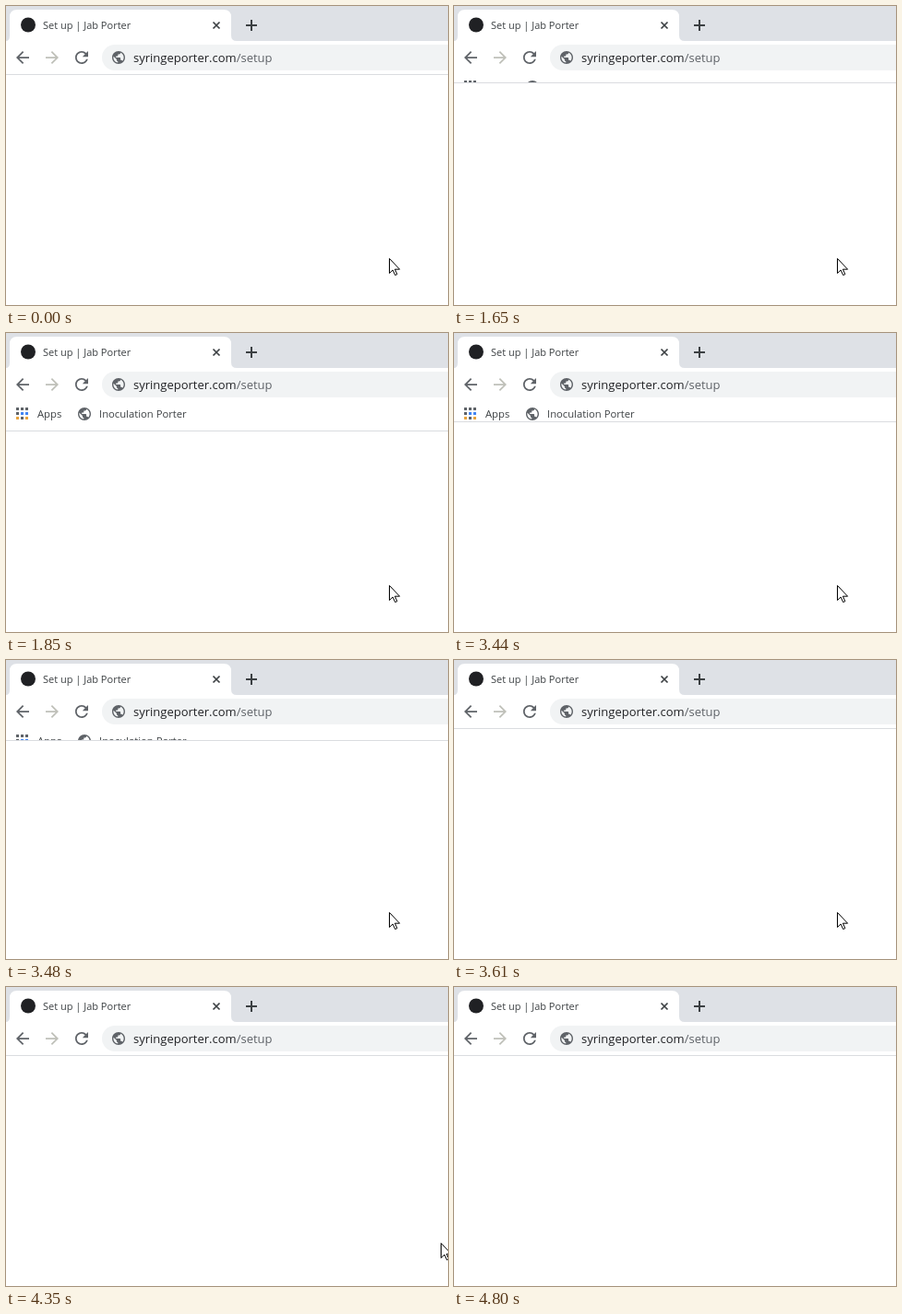
An HTML page for the animation above (4.87 s loop, 479 px wide and 325 px high).

```html
<!DOCTYPE html>
<html lang="en">
<head>
<meta charset="utf-8">
<title>Bookmarks bar</title>
<style>
  html, body { margin: 0; width: 100%; height: 100%; overflow: hidden; background: #fff; }
  svg { display: block; width: 100vw; height: 100vh; }
  text { font-family: "Open Sans", "Noto Sans", sans-serif; fill: #3c4043; }
  .tab { font-size: 11px; }
  .address { font-size: 13px; fill: #202124; }
  .address tspan { fill: #5f6368; }
  .bookmark { font-size: 11.25px; }
</style>
</head>
<body>
<svg viewBox="0 0 479 325">
  <defs>
    <path id="arrow" transform="scale(.875) translate(-12 -12)" d="M20 11H7.83l5.59-5.59L12 4l-8 8 8 8 1.41-1.41L7.83 13H20z"/>
    <path id="globe" transform="scale(.7) translate(-12 -12)" d="M12 2C6.48 2 2 6.48 2 12s4.48 10 10 10 10-4.48 10-10S17.52 2 12 2zm-1 17.93c-3.95-.49-7-3.85-7-7.93 0-.62.08-1.21.21-1.79L9 15v1c0 1.1.9 2 2 2zm6.9-2.54c-.26-.81-1-1.39-1.9-1.39h-1v-3c0-.55-.45-1-1-1H8v-2h2c.55 0 1-.45 1-1V7h2c1.1 0 2-.9 2-2v-.41c2.93 1.19 5 4.06 5 7.41 0 2.08-.8 3.97-2.1 5.39z"/>
  </defs>

  <!-- Tab strip -->
  <rect width="479" height="38" fill="#dee1e6"/>
  <path d="M0 38q4 0 4-6V12q0-8 8-8h224q8 0 8 8v20q0 6 6 6z" fill="#fff"/>
  <circle cx="24" cy="20.5" r="8" fill="#202124"/>
  <text class="tab" x="40" y="25">Set up | Jab Porter</text>
  <path d="M224.5 17.5l7 7m0-7l-7 7" stroke="#3c4043" stroke-width="1.7"/>
  <path d="M260 21h12m-6-6v12" stroke="#3c4043" stroke-width="2"/>

  <!-- Toolbar -->
  <g fill="#5f6368">
    <use href="#arrow" x="18" y="56"/>
    <use href="#arrow" transform="translate(50 56) scale(-1 1)" fill="#bfc0b9"/>
    <path transform="translate(82 56) scale(.875) translate(-12 -12)" d="M17.65 6.35C16.2 4.9 14.21 4 12 4c-4.42 0-7.99 3.58-7.99 8s3.57 8 7.99 8c3.73 0 6.84-2.55 7.73-6h-2.08c-.82 2.33-3.04 4-5.65 4-3.31 0-6-2.69-6-6s2.69-6 6-6c1.66 0 3.14.69 4.22 1.78L13 11h7V4z"/>
    <rect x="104" y="42" width="400" height="28" rx="14" fill="#f1f3f4"/>
    <use href="#globe" x="122" y="56"/>
  </g>
  <text class="address" x="138" y="61">syringeporter.com<tspan>/setup</tspan></text>

  <!-- Bookmarks, uncovered as the page slides down -->
  <g id="apps"></g>
  <text class="bookmark" x="34" y="92">Apps</text>
  <use href="#globe" x="85" y="88" fill="#5f6368"/>
  <text class="bookmark" x="101" y="92">Inoculation Porter</text>

  <g id="page">
    <rect y="74" width="479" height="260" fill="#fff"/>
    <rect y="74" width="479" height="1" fill="#dadce0"/>
  </g>
  <path id="cursor" d="M.5.5v16l3.7-3.5 2.5 5.6 2.2-1-2.5-5.4h5.2z" fill="#fff" stroke="#000"/>
</svg>
<script>
  const LOOP = 4870, BAR = 32;
  const OPEN_TIMES = [1650, 1690, 1740, 1790, 1850];
  const CLOSE_TIMES = [3440, 3480, 3540, 3610];

  // [time, x, y] of the pointer tip
  const EXIT = [[4130, 415, 274], [4260, 443, 274], [4350, 471, 278],
                [4430, 473, 292], [4520, 462, 312], [4600, 450, 326]];
  const PEEK = [[4700, 432, 320], [4800, 434, 322]];

  const page = document.getElementById('page');
  const cursor = document.getElementById('cursor');

  const DOT_COLORS = ['#5f6368', '#5f6368', '#5f6368',
                      '#5f6368', '#4285f4', '#4285f4',
                      '#e8a33d', '#5f6368', '#e8a33d'];
  document.getElementById('apps').innerHTML = DOT_COLORS.map((color, i) =>
    `<rect x="${11 + i % 3 * 5}" y="${81 + Math.floor(i / 3) * 5}" width="3" height="3" fill="${color}"/>`
  ).join('');

  // Ease-out progress, sampled at the latest step time
  function steppedProgress(t, start, times) {
    const now = times.filter(time => time <= t).pop();
    if (now === undefined) return 0;
    const left = 1 - (now - start) / (times[times.length - 1] - start);
    return 1 - left * left;
  }

  function along(path, t) {
    const i = path.findIndex(key => key[0] > t);
    const [t0, x0, y0] = path[i - 1], [t1, x1, y1] = path[i];
    const k = (t - t0) / (t1 - t0);
    return [x0 + (x1 - x0) * k, y0 + (y1 - y0) * k].map(Math.round);
  }

  function pointerAt(t) {
    if (t < 4170) return [415, 274];
    if (t < 4600) return along(EXIT, t);
    if (t >= 4700 && t < 4800) return along(PEEK, t);
    return [0, 400];
  }

  function draw() {
    const t = performance.now() % LOOP;
    const shown = steppedProgress(t, 1615, OPEN_TIMES) - steppedProgress(t, 3405, CLOSE_TIMES);
    page.setAttribute('transform', `translate(0 ${Math.round(BAR * shown)})`);
    cursor.setAttribute('transform', `translate(${pointerAt(t)})`);
    requestAnimationFrame(draw);
  }
  draw();
</script>
</body>
</html>
```
